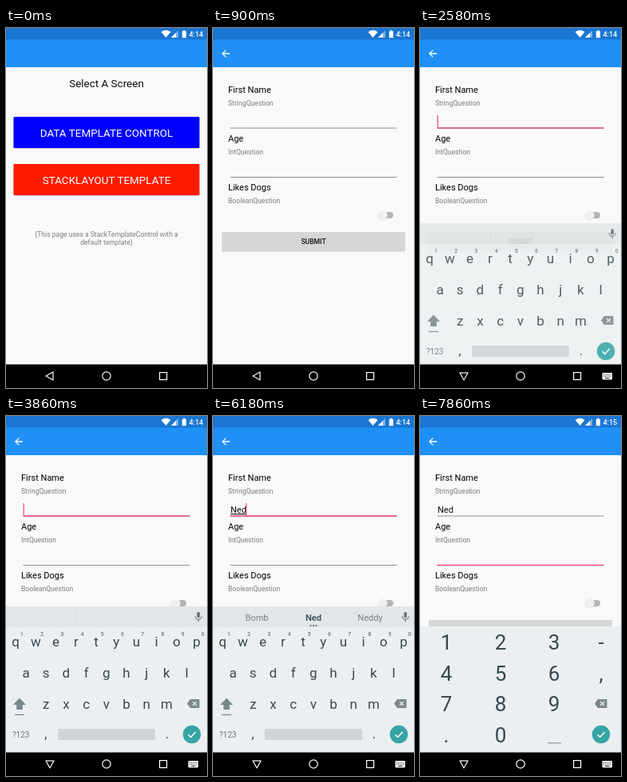
An HTML page that plays this animation: 252x450 px, repeating every 8 s.

```html
<!DOCTYPE html>
<html lang="en">
<head>
<meta charset="utf-8">
<title>Template form demo</title>
<style>
html, body { margin: 0; width: 100%; height: 100%; overflow: hidden; background: #faf9fa; }
svg { display: block; width: 100vw; height: 100vh; font-family: Roboto, "Noto Sans", sans-serif; }
</style>
</head>
<body>
<svg id="stage" viewBox="0 0 252 450"></svg>
<script>
const LOOP = 8000;
const INK = '#37474f', KEY = '#eceff1', GREY = '#7c7c7c', PINK = '#f0437a';
const stage = document.getElementById('stage');

function add(parent, tag, attrs = {}) {
  const el = document.createElementNS('http://www.w3.org/2000/svg', tag);
  for (const k in attrs) el.setAttribute(k, attrs[k]);
  parent.append(el);
  return el;
}
const group = (parent, attrs) => add(parent, 'g', attrs);
const rect = (parent, x, y, width, height, fill, more) =>
  add(parent, 'rect', { x, y, width, height, fill, ...more });
const path = (parent, d, more) => add(parent, 'path', { d, fill: 'none', ...more });

function text(parent, x, y, size, str, more) {
  const el = add(parent, 'text', { x, y, 'font-size': size, fill: '#111', ...more });
  el.textContent = str;
  return el;
}
const mid = (parent, x, y, size, str, more) =>
  text(parent, x, y, size, str, { 'text-anchor': 'middle', ...more });

// Each row is [ms, styles]; a value holds until the next row.
function play(el, rows) {
  const frames = rows.map(([t, style]) => ({ offset: t / LOOP, easing: 'step-end', ...style }));
  frames.push({ offset: 1, ...rows[rows.length - 1][1] });
  el.animate(frames, { duration: LOOP, iterations: Infinity });
}

// Show an element only within the given [from, to] spans.
function show(el, ...spans) {
  const rows = spans[0][0] > 0 ? [[0, { opacity: 0 }]] : [];
  for (const [from, to] of spans) {
    rows.push([from, { opacity: 1 }]);
    if (to < LOOP) rows.push([to, { opacity: 0 }]);
  }
  play(el, rows);
}

function drawMenu() {
  const g = group(stage);
  g.style.transformOrigin = '126px 234px';
  rect(g, -5, 40, 262, 390, '#faf9fa');
  mid(g, 126, 74, 13.48, 'Select A Screen');
  [[111, '#0000ff', 'DATA TEMPLATE CONTROL'], [170, '#ff1a00', 'STACKLAYOUT TEMPLATE']]
    .forEach(([y, fill, label]) => {
      rect(g, 9.5, y + 0.8, 233, 39, '#000', { rx: 1, opacity: 0.22 });
      rect(g, 9.5, y, 233, 39, fill, { rx: 1 });
      mid(g, 126, y + 25, 13.48, label, { fill: '#fff' });
    });
  mid(g, 126, 261, 8.58, '(This page uses a StackTemplateControl with a', { fill: GREY });
  mid(g, 126, 271, 8.58, 'default template)', { fill: GREY });
  play(g, [[0, { transform: 'scale(1)' }], [580, { transform: 'scale(.997)' }],
    [660, { transform: 'scale(.992)' }], [740, { transform: 'scale(.985)' }],
    [820, { transform: 'scale(.98)' }]]);
}

function drawForm() {
  const g = group(stage);
  g.style.transformOrigin = '126px 234px';
  rect(g, 0, 49, 252, 372, '#faf9fa');
  [['First Name', 'StringQuestion', 81], ['Age', 'IntQuestion', 142], ['Likes Dogs', 'BooleanQuestion', 203]]
    .forEach(([title, kind, y]) => {
      text(g, 19, y, 11.03, title, { fill: '#000' });
      text(g, 19, y + 16.3, 8.58, kind, { fill: GREY });
    });
  [[125, 2260, 6580], [186.5, 6580, LOOP]].forEach(([y, from, to]) => {
    rect(g, 21.5, y - 0.4, 209, 0.9, '#858585');
    show(rect(g, 21.5, y - 0.7, 209, 1.4, PINK), [from, to]);
  });

  rect(g, 208, 230, 18, 8, '#b4b4b4', { rx: 4 });
  add(g, 'circle', { cx: 213, cy: 234.6, r: 6, fill: '#000', opacity: 0.1 });
  add(g, 'circle', { cx: 213, cy: 234, r: 5.8, fill: '#f1f0f1' });
  rect(g, 11, 255.6, 230, 24, '#000', { rx: 1, opacity: 0.14 });
  rect(g, 11, 255, 230, 24, '#d6d6d6', { rx: 1 });
  mid(g, 126, 270, 8.58, 'SUBMIT', { 'font-weight': 500 });

  const name = 'Ned';
  [5140, 5300, 5460].forEach((t, i) => {
    const typed = text(g, 22, 121, 11.03, name.slice(0, i + 1), { 'text-decoration': 'underline' });
    show(typed, [t, [5300, 5460, 6580][i]]);
  });
  show(text(g, 22, 121, 11.03, name), [6580, LOOP]);

  const caret = (x, y, ...spans) => show(rect(g, x, y, 1.2, 15, PINK), ...spans);
  caret(21.6, 109, [2260, 2740], [2980, 3380], [3860, 4180], [4580, 4980]);
  caret(30, 109, [5140, 5300]);
  caret(35.8, 109, [5300, 5460]);
  caret(41, 109, [5460, 5860], [6180, 6580]);
  caret(21.6, 170, [6580, 7060], [7460, 7860]);

  play(g, [[0, 0, 1.14], [500, 0.02, 1.14], [580, 0.08, 1.12], [660, 0.2, 1.1],
    [740, 0.52, 1.05], [820, 0.86, 1.015], [900, 1, 1]]
    .map(([t, opacity, s]) => [t, { opacity, transform: `scale(${s})` }]));
}

function drawErase(g, x, y) {
  path(g, `M${x - 8} ${y}l4 -5.5h11.5v11h-11.5z`, { fill: '#7b878d' });
  path(g, `M${x - 1} ${y - 2.5}l5 5m0 -5l-5 5`, { stroke: KEY, 'stroke-width': 1.2 });
}

function drawEnter(g, x) {
  add(g, 'circle', { cx: x, cy: 398, r: 11.2, fill: '#37a5a5' });
  path(g, `M${x - 4.5} 398.3l3.2 3.2l6 -6.4`, { stroke: '#fff', 'stroke-width': 1.5 });
}

function drawLetters() {
  const outer = group(stage);
  const g = group(outer);
  rect(g, 0, 238, 252, 200, KEY);
  rect(g, 0, 238, 252, 26, '#e3e6e8');

  const idle = group(g);
  rect(idle, 88, 245, 0.7, 12, '#d2d6d8');
  rect(idle, 163, 245, 0.7, 12, '#d9dcde');
  show(idle, [0, 5380]);
  const hints = group(g);
  mid(hints, 55, 256, 11.1, 'Bomb', { fill: '#738086' });
  mid(hints, 126, 256, 11.1, 'Ned', { fill: '#455a64', 'font-weight': 700 });
  mid(hints, 197, 256, 11.1, 'Neddy', { fill: '#738086' });
  [-3.5, 0, 3.5].forEach(d => add(hints, 'circle', { cx: 126 + d, cy: 262, r: 1, fill: '#455a64' }));
  show(hints, [5380, LOOP]);

  rect(g, 239.4, 245, 3.6, 7.2, '#65737a', { rx: 1.8 });
  path(g, 'M237.2 250.2a4 4 0 0 0 8 0M241.2 254.2v3', { stroke: '#65737a', 'stroke-width': 1.1 });

  [['qwertyuiop', 12.2, 288], ['asdfghjkl', 25, 327], ['zxcvbnm', 50.2, 365.5]]
    .forEach(([keys, x, y]) => [...keys].forEach((k, i) =>
      mid(g, x + i * 25.2, y, 17, k, { fill: INK })));
  [...'1234567890'].forEach((k, i) =>
    mid(g, 20 + i * 25.2, 274.5, 6.8, k, { fill: '#69777e', 'font-weight': 500 }));

  path(g, 'M17 352.5l8 8.5h-4.2v6h-7.6v-6h-4.2z', { fill: '#7b878d' });
  rect(g, 11, 372.8, 12, 1.3, '#7b878d');
  drawErase(g, 235, 359.5);
  mid(g, 18.7, 402, 10, '?123', { fill: '#69777e' });
  mid(g, 50, 403, 17, ',', { fill: INK });
  rect(g, 65, 391, 122, 14, '#d0d4d6', { rx: 1 });
  mid(g, 202, 403, 17, '.', { fill: INK });
  drawEnter(g, 233);

  play(g, [[0, 0, 48], [2340, 0.08, 38], [2420, 0.32, 24], [2500, 0.66, 13],
    [2580, 0.88, 6], [2660, 0.97, 2], [2740, 1, 0]]
    .map(([t, opacity, y]) => [t, { opacity, transform: `translateY(${y}px)` }]));
  show(outer, [0, 6660]);
}

function drawNumbers() {
  const g = group(stage);
  rect(g, 0, 263, 252, 160, KEY);
  const cols = [33, 101, 168, 227];
  ['123-', '456,', '789', '.0'].forEach((row, r) => [...row].forEach((k, c) =>
    mid(g, cols[c], 292 + r * 38.5, 26, k, { fill: INK })));
  rect(g, 160, 408, 17, 1.4, '#9aa4a9');
  drawErase(g, 227, 359.5);
  drawEnter(g, 227);
  show(g, [6660, LOOP]);
}

function drawBars() {
  rect(stage, 0, 0, 252, 15, '#1a76d2');
  rect(stage, 0, 14.5, 252, 34.5, '#1f90f5');
  const white = { fill: '#fff' };
  path(stage, 'M194.5 5Q200.5 0.5 206.5 5L200.5 12z', white);
  path(stage, 'M216 3v9h-9z', { fill: '#fff', opacity: 0.45 });
  path(stage, 'M213 6v6h-6z', white);
  path(stage, 'M220.8 4h1.5v-1.2h2.2v1.2h1.5v8.2h-5.2z', white);
  const clock = str => mid(stage, 238.3, 10.9, 9, str, { fill: '#fff', 'font-weight': 500 });
  show(clock('4:14'), [0, 7700]);
  show(clock('4:15'), [7700, LOOP]);

  const back = path(stage, 'M21 32h-9m4.3 -4.4l-4.4 4.4l4.4 4.4', { stroke: '#fff', 'stroke-width': 1.3 });
  show(back, [500, LOOP]);

  rect(stage, 0, 420.5, 252, 30, '#000');
  const line = { stroke: '#fff', 'stroke-width': 1.2 };
  const tri = path(stage, 'M50 435l9 -5v10z', { ...line, 'stroke-linejoin': 'round' });
  tri.style.transformOrigin = '55px 435px';
  play(tri, [[0, 0], [2340, -18], [2420, -48], [2500, -78], [2580, -90]]
    .map(([t, a]) => [t, { transform: `rotate(${a}deg)` }]));
  add(stage, 'circle', { cx: 126, cy: 435, r: 5.2, fill: 'none', ...line });
  rect(stage, 192.6, 430.6, 9, 9, 'none', line);

  const keys = group(stage);
  rect(keys, 228.5, 431, 12.5, 8.4, '#fff', { rx: 0.8 });
  path(keys, 'M230 433.2h9.6M230 435.3h9.6', { stroke: '#000', 'stroke-width': 0.9, 'stroke-dasharray': '1.1 1' });
  path(keys, 'M232 437.6h5.5', { stroke: '#000', 'stroke-width': 0.9 });
  show(keys, [2420, LOOP]);
}

drawMenu();
drawForm();
drawLetters();
drawNumbers();
drawBars();
</script>
</body>
</html>
```
